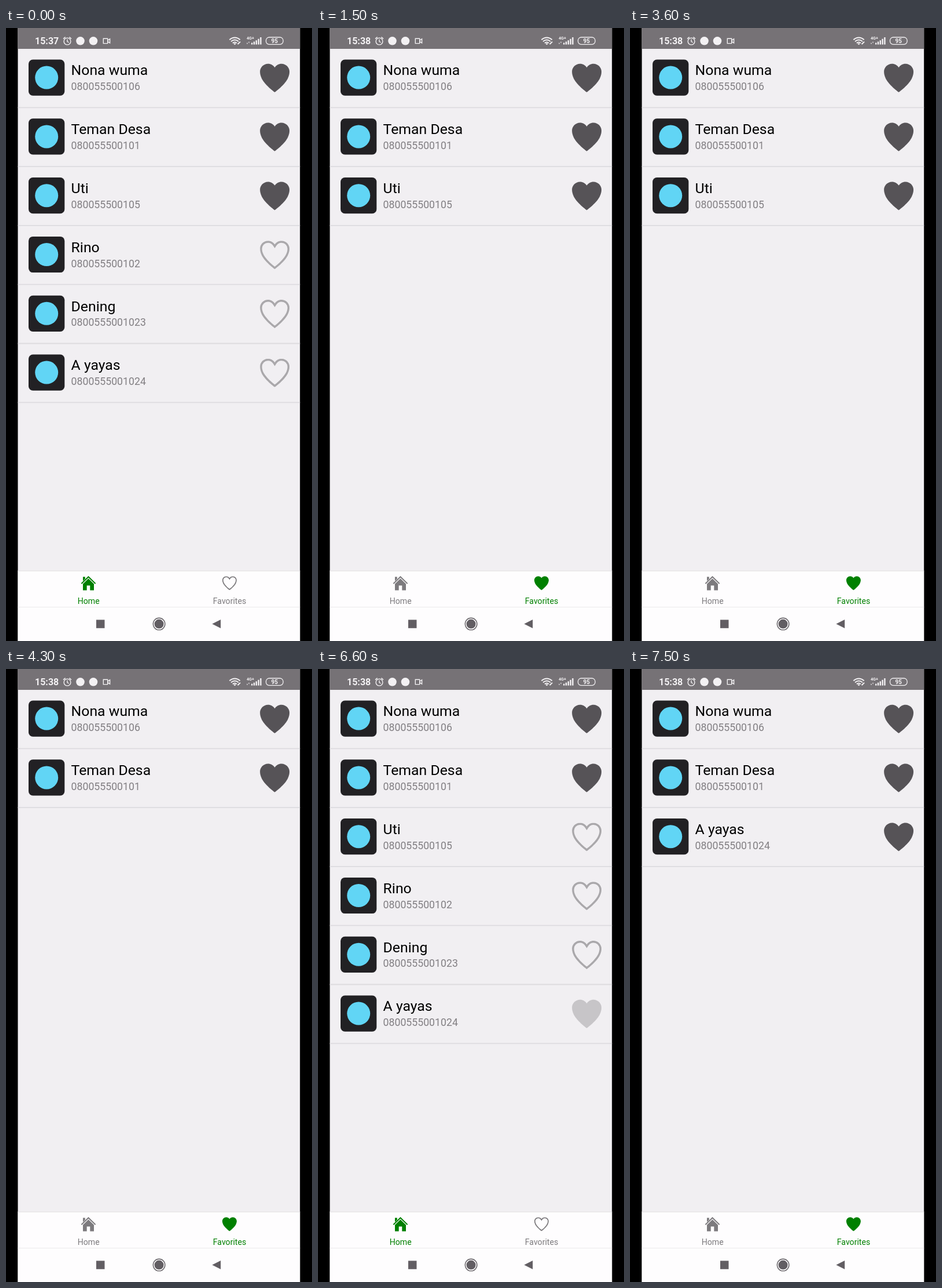
Recreate the animation shown at these times as an HTML page. Size 529 px wide and 1058 px high, loop 8000 ms.

```html
<!DOCTYPE html>
<html lang="id">
<head>
<meta charset="utf-8">
<title>Contacts</title>
<style>
  html, body { margin: 0; width: 100%; height: 100%; overflow: hidden; background: #000; }
  svg { display: block; width: 100%; height: 100%; font-family: Roboto, "Liberation Sans", sans-serif; }
</style>
</head>
<body>
<svg viewBox="0 0 529 1058">
  <defs>
    <path id="heart" d="M352 56h-1c-39.7 0-74.8 21-95 52-20.2-31-55.3-52-95-52h-1c-61.9.6-112 50.9-112 113 0 37 16.2 89.5 47.8 132.7C156 384 256 456 256 456s100-72 160.2-154.3C447.8 258.5 464 206 464 169c0-62.1-50.1-112.4-112-113z"/>
    <clipPath id="heartClip"><use href="#heart"/></clipPath>
  </defs>
  <rect width="529" height="1058"/>
  <rect x="20.5" width="487.7" height="1058" fill="#f1eff2"/>
  <rect x="20.5" width="487.7" height="36" fill="#767276"/>

  <g fill="#f3f1f3">
    <text id="clock" x="50" y="28" font-size="16" font-weight="700"></text>
    <g fill="none" stroke="#f3f1f3" stroke-width="1.4">
      <circle cx="106" cy="23" r="5.9"/>
      <path d="M106 19.5V23.4L108.6 25M99 18.6L102.6 15.6M113 18.6L109.4 15.6"/>
      <path d="M168.3 18.2h7.4v8.4h-7.4zM176 21.4L179.6 18.8V26L176 23.4"/>
      <rect x="449.5" y="16" width="29.6" height="12.4" rx="5.6" stroke-width="1.3"/>
    </g>
    <circle cx="128.5" cy="22.3" r="7.3"/>
    <circle cx="151" cy="22.3" r="7.3"/>
    <g fill="none" stroke="#f3f1f3" stroke-width="1.8">
      <path d="M386.3 20.2Q395.5 12.8 404.7 20.2M389 23.2Q395.5 17.8 402 23.2M391.8 26Q395.5 23 399 26"/>
      <path d="M400.5 28l4.6-4.4" stroke-width="2"/>
    </g>
    <path d="M393.2 27L395.5 29.3 397.8 27Q395.5 25.4 393.2 27z"/>
    <text x="416" y="20.2" font-size="7.2" font-weight="700">4G+</text>
    <path d="M416 25.7h2l-1 2.5zM419 25.5h2l-1-2.5z"/>
    <path d="M424 25.5h2.4V28.5H424zM427.8 23.5h2.4v5h-2.4zM431.6 21.3h2.4v7.2h-2.4zM435.4 18.8h2.4v9.7h-2.4zM439.2 16h2.4v12.5h-2.4z"/>
    <text x="464.3" y="25.9" font-size="10" font-weight="700" text-anchor="middle">95</text>
  </g>

  <g id="list"></g>

  <rect x="20.5" y="936.5" width="487.7" height="121.5" fill="#fefdfe"/>
  <path d="M20.5 937H508.2" stroke="#dddbde" stroke-width="1.2"/>
  <path d="M20.5 999.5H508.2" stroke="#eceaec"/>
  <g id="homeTab">
    <path d="M130.4 959L142.5 947.2 154.6 959" fill="none" stroke="currentColor" stroke-width="1.9"/>
    <path d="M133 947.2h3.8v3.6l-3.8 3.7z" fill="currentColor"/>
    <path d="M142.5 950.2L152 959.4V970.5H145.3V962.3H139.7V970.5H133V959.4z" fill="currentColor"/>
    <text x="142.7" y="993.6" font-size="14.1" text-anchor="middle" fill="currentColor">Home</text>
  </g>
  <g id="favTab">
    <g id="favIcon"></g>
    <text x="386.5" y="993.6" font-size="14.1" text-anchor="middle" fill="currentColor">Favorites</text>
  </g>

  <g fill="#625e63">
    <rect x="156" y="1021.4" width="14.5" height="14.4"/>
    <circle cx="264.6" cy="1028.6" r="8"/>
    <circle cx="264.6" cy="1028.6" r="10.3" fill="none" stroke="#625e63" stroke-width="1.4"/>
    <path d="M356.4 1028.5L371.2 1021V1036z"/>
  </g>
</svg>
<script>
const LOOP = 8000, ROW = 101.8;
const GREEN = '#008000', GRAY = '#7d7b7e';
const contacts = [
  ['Nona wuma', '080055500106'],
  ['Teman Desa', '080055500101'],
  ['Uti', '080055500105'],
  ['Rino', '080055500102'],
  ['Dening', '0800555001023'],
  ['A yayas', '0800555001024']
];
const UNLIKED = 2, LIKED = 5;
const tabSwitches = [1400, 2400, 3600, 5500, 7500];
const presses = {
  [UNLIKED]: { down: 4100, up: 4300 },
  [LIKED]: { down: 6400, up: 6600 }
};
const $ = id => document.getElementById(id);

// The outline is a clipped stroke, so it stays inside the filled shape.
function heart(cx, top, width, filled, color) {
  const scale = width / 416;
  const paint = filled ? `fill="${color}"`
    : `fill="none" stroke="${color}" stroke-width="57" clip-path="url(#heartClip)"`;
  return `<g transform="translate(${cx - 256 * scale} ${top - 56 * scale}) scale(${scale})">
    <use href="#heart" ${paint}/></g>`;
}

function row({ id, liked, alpha }, index) {
  const [name, phone] = contacts[id];
  return `<g transform="translate(0 ${index * ROW})">
    <rect x="39" y="54.5" width="62.3" height="62.2" rx="7.5" fill="#222124"/>
    <circle cx="70.2" cy="85.6" r="20" fill="#61d5f5"/>
    <text x="112.6" y="81.4" font-size="24.8">${name}</text>
    <text x="112.6" y="107.2" font-size="17.7" fill="#827f83">${phone}</text>
    <g opacity="${alpha}">${heart(464.6, 61.8, 51, liked, liked ? '#565357' : '#aaa8ab')}</g>
    <path d="M20.5 137.3H508.2" stroke="#dddbdf" stroke-width="1.8"/>
  </g>`;
}

function heartAlpha(id, t) {
  const press = presses[id];
  if (!press || t < press.down) return 1;
  if (t < press.up) return 0.2;
  const p = Math.min(1, (t - press.up + 50) / 250);
  const eased = p < 0.5 ? 2 * p * p : 1 - 2 * (1 - p) ** 2;
  return 0.2 + 0.8 * eased;
}

function isLiked(id, t) {
  if (id === UNLIKED) return t < presses[id].up;
  if (id === LIKED) return t >= presses[id].up;
  return id < UNLIKED;
}

function render(t) {
  const onFavorites = tabSwitches.filter(s => t >= s).length % 2 === 1;
  const rows = contacts
    .map((_, id) => ({ id, liked: isLiked(id, t), alpha: heartAlpha(id, t) }))
    .filter(c => !onFavorites || c.liked);
  $('list').innerHTML = rows.map(row).join('');
  $('clock').textContent = t < 500 ? '15:37' : '15:38';
  $('homeTab').style.color = onFavorites ? GRAY : GREEN;
  $('favTab').style.color = onFavorites ? GREEN : GRAY;
  $('favIcon').innerHTML = heart(386.4, 946.2, 25, onFavorites, 'currentColor');
}

const start = performance.now();
let shown = -1;
function tick() {
  const elapsed = (performance.now() - start) % LOOP;
  const t = Math.floor(elapsed / 100) * 100;
  if (t !== shown) render(shown = t);
  requestAnimationFrame(tick);
}
tick();
</script>
</body>
</html>
```
